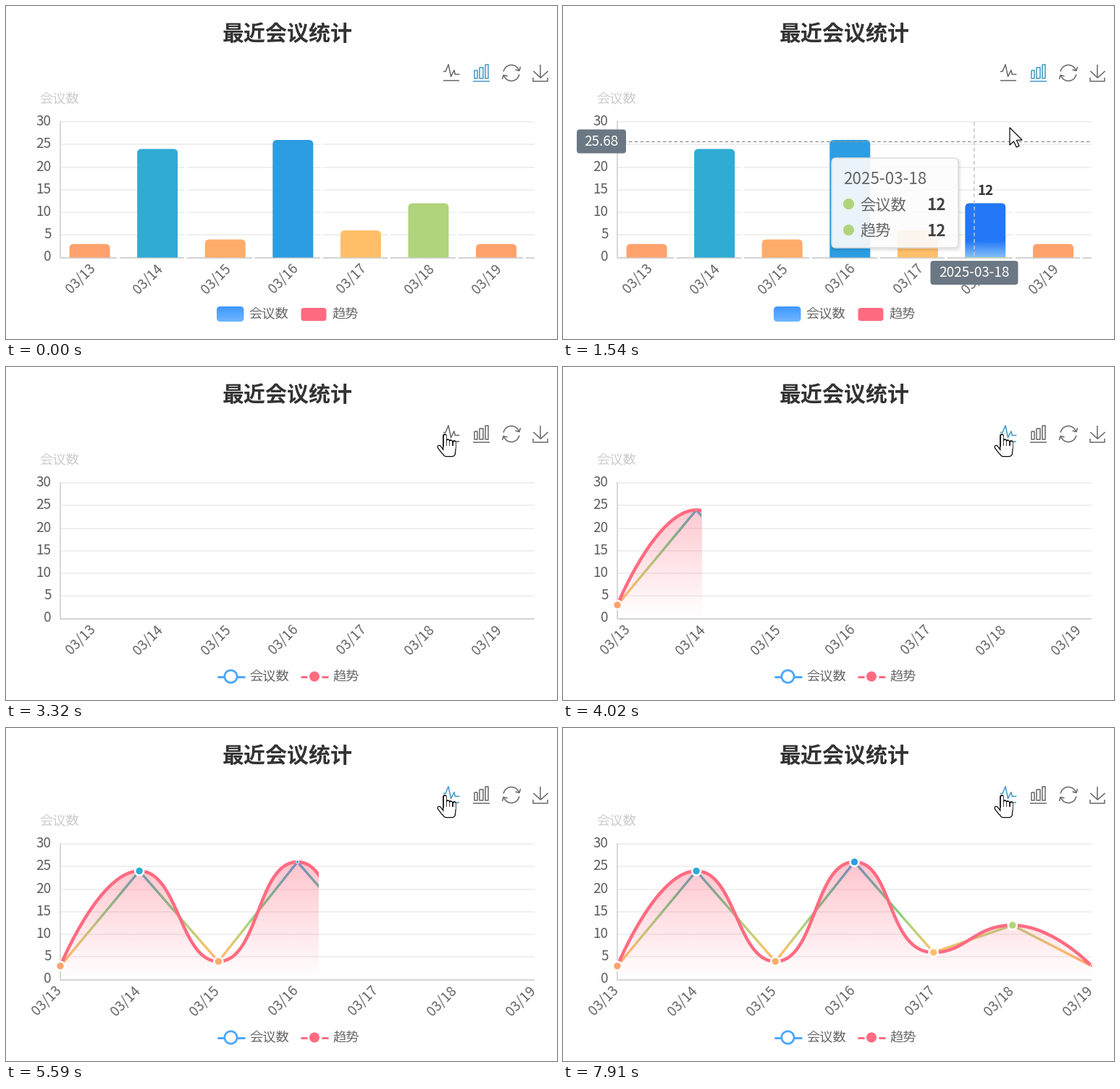
Recreate the animation shown at these times as a matplotlib script. Size 761 px wide and 460 px high, loop 8000 ms.

```python
import numpy as np
import matplotlib.pyplot as plt
from matplotlib.animation import FuncAnimation
from matplotlib.collections import LineCollection
from matplotlib.colors import LinearSegmentedColormap, to_rgba
from matplotlib.patches import Arc, Circle, FancyBboxPatch, PathPatch, Polygon
from matplotlib.path import Path
from matplotlib.transforms import Affine2D, Bbox

W, H, DPI = 761, 460, 64
STEP, LOOP = 50, 8000
LEFT, RIGHT, TOP, BASE = 75, 730, 160, 347.5
UNIT = (BASE - TOP) / 30
BAND = (RIGHT - LEFT) / 7
VALUES = [3, 24, 4, 26, 6, 12, 3]
DAYS = range(13, 20)
PINK, BLUE, GRAY, ACTIVE = "#ff6b81", "#4da6ff", "#666666", "#3e98c5"
SLATE = "#6b7883"
RAMP = LinearSegmentedColormap.from_list(
    "heat", ["#ff8770", "#ffbf69", "#b0d47b", "#5fc882", "#2fabd4", "#2a80ff"])

fig = plt.figure(figsize=(W / DPI, H / DPI), dpi=DPI, facecolor="white")
ax = fig.add_axes([0, 0, 1, 1])
ax.axis("off")
ax.set(xlim=(0, W), ylim=(H, 0))
ax.set_autoscale_on(False)
plt.rcParams["font.family"] = ["Noto Sans CJK JP", "DejaVu Sans"]


def pt(pixels):
    return pixels * 72 / DPI


def height(value):
    return BASE - value * UNIT


def heat(value):
    return RAMP(np.asarray(value) / 30)


def text(x, y, s, size=18.9, color=GRAY, ha="left", z=4, **kw):
    return ax.text(x, y, s, fontsize=pt(size), color=color, ha=ha, va="baseline", zorder=z, **kw)


def line(xs, ys, color, width, z=1, **kw):
    kw.setdefault("solid_capstyle", "butt")
    return ax.plot(xs, ys, color=color, lw=pt(width), zorder=z, **kw)[0]


def box(x, y, w, h, r, z=3, **kw):
    kw.setdefault("lw", 0)
    return ax.add_patch(FancyBboxPatch((x, y), w, h, zorder=z,
                                       boxstyle=f"round,pad=0,rounding_size={r}", **kw))


def circle(x, y, r, z, **kw):
    kw.setdefault("lw", 0)
    return ax.add_patch(Circle((x, y), r, zorder=z, **kw))


def gradient(x0, x1, y0, y1, start, end, z, hold=0):
    """Vertical colour ramp that keeps its first colour up to the share `hold`."""
    share = np.clip((np.linspace(0, 1, 128) - hold) / (1 - hold), 0, 1)[:, None, None]
    data = (1 - share) * np.array(to_rgba(start)) + share * np.array(to_rgba(end))
    return ax.imshow(data, extent=(x0, x1, y1, y0), aspect="auto",
                     interpolation="bilinear", zorder=z)


def show(artists, visible):
    for artist in artists:
        artist.set_visible(bool(visible))


# Title, grid and axes
text(388.5, 48.2, "最近会议统计", 30, "#333333", "center", weight="bold")
text(46.8, 133.5, "会议数", 18.3, "#cccccc")
for tick in range(0, 31, 5):
    y = height(tick)
    if tick:
        line([LEFT, RIGHT], [y, y], "#ebebeb", 1.5, 0.5)
    text(62.5, y + 5, str(tick), color="#5c5c5c", ha="right")
line([LEFT, LEFT], [TOP - 1, BASE], "#cccccc", 1.5, 0.8)
line([LEFT, RIGHT], [BASE + 0.5] * 2, "#c6c6c6", 1.5, 0.8)
day_labels = [text(0, 381, f"03/{d}", ha="center", rotation=45,
                   rotation_mode="anchor") for d in DAYS]


# Toolbox icons
def icon(cx, cy, scale, *strokes):
    points = np.concatenate(strokes)
    middle = (points.min(0) + points.max(0)) / 2
    parts = [(np.array(s) - middle) * scale + (cx, cy) for s in strokes]
    return [line(p[:, 0], p[:, 1], GRAY, 1.5, 5) for p in parts]


def column(x, y):
    return [(x, y), (x + 10, y), (x + 10, 48), (x, 48), (x, y)]


line_icon = icon(615.2, 92, 0.44, [(4, 58), (55, 58)],
                 [(4, 29), (11, 29), (20, 7), (28, 45), (38, 25), (41, 38), (55, 38)])
bar_icon = icon(656.5, 92.2, 0.41, [(3, 58), (57, 58)],
                *[column(6.7 + 18.3 * i, 23 - 10.5 * i) for i in range(3)])
icon(738.5, 92.4, 0.41, [(5, 23), (29.5, 45.5), (54.5, 23)], [(29.5, 45), (29.5, 0)],
     [(5, 44), (5, 58), (54, 58), (54, 44)])
for side in (1, -1):
    ax.add_patch(Arc((698, 92.5), 22, 22, theta1=100 - 90 * side, theta2=252 - 90 * side,
                     color=GRAY, lw=pt(1.5), zorder=5))
    line(698 + side * np.array([12.5, 11, 5.5]), 92.5 - side * np.array([8.5, 3, 4.5]),
         GRAY, 1.5, 5)


# Bars
def bar_path(x, value, w=56, r=6):
    t = height(value)
    points = [(x, BASE), (x, t + r), (x, t), (x + r, t), (x + w - r, t),
              (x + w, t), (x + w, t + r), (x + w, BASE), (x, BASE)]
    L, C = Path.LINETO, Path.CURVE3
    return Path(points, [Path.MOVETO, L, C, C, L, C, C, L, L])


bar_x = [LEFT + 12.6 + BAND * i for i in range(7)]
bars, bar_extras = [], []
for x, value in zip(bar_x, VALUES):
    bars.append(ax.add_patch(PathPatch(bar_path(x, value), fc=heat(value), lw=0, zorder=2)))
    bar_extras.append(line([x + 67.2] * 2, [height(value) - 2, BASE + 1.5], "white", 3.5, 1.5))
hot_bar = gradient(0, 56, 0, 1, "#2378f7", "#83bff6", 2.2, hold=0.7)
hot_label = text(0, 0, "", color="#333333", ha="center", weight="bold")

# Legends
swatch = box(291, 415, 37.5, 21, 5, fc="none")
fill = gradient(291, 328.5, 415, 436, "#4098ff", "#70b6ff", 3)
fill.set_clip_path(swatch)
bar_legend = [fill, box(407.5, 417, 35, 18, 4, fc=PINK)]
line_legend = [line([291.5, 329.5], [427.5] * 2, BLUE, 3, 3),
               circle(310.5, 427.5, 8.6, 4, fc="white", ec=BLUE, lw=pt(2.8)),
               line([407, 416], [427.5] * 2, PINK, 3, 3),
               line([436, 445], [427.5] * 2, PINK, 3, 3),
               circle(426, 427.5, 7, 4, fc=PINK)]
for group, shift in ((bar_legend, 0), (line_legend, 1)):
    group += [text(335.5 + shift, 430.5 + 1.5 * shift, "会议数", 18.3),
              text(450.5 + shift, 430.5 + 1.5 * shift, "趋势", 18.3)]

# Line chart
knots = np.array([(LEFT + i * (RIGHT - LEFT) / 6, height(v)) for i, v in enumerate(VALUES)])


def smooth_curve(points, tension=0.5):
    """Bezier spline whose handles stay inside the box of each segment."""
    inner, outer = points.copy(), points.copy()
    for i in range(1, len(points) - 1):
        before, p, after = points[i - 1:i + 2]
        a, b = np.hypot(*(p - before)), np.hypot(*(after - p))
        handle = p + (after - before) * tension * b / (a + b)
        handle = np.clip(handle, np.minimum(p, after), np.maximum(p, after))
        back = p - (handle - p) * a / b
        back = np.clip(back, np.minimum(p, before), np.maximum(p, before))
        inner[i], outer[i] = back, p + (p - back) * b / a
    s = np.linspace(0, 1, 40)[:, None]
    return np.concatenate([
        (1 - s) ** 3 * points[i] + 3 * s * (1 - s) ** 2 * outer[i]
        + 3 * s ** 2 * (1 - s) * inner[i + 1] + s ** 3 * points[i + 1]
        for i in range(len(points) - 1)])


curve = smooth_curve(knots)
trend = line(curve[:, 0], curve[:, 1], PINK, 4.5, 2.6, solid_joinstyle="round")

xs = np.union1d(np.linspace(LEFT, RIGHT, 330), knots[:, 0])
ys = np.interp(xs, knots[:, 0], knots[:, 1])
pairs = np.stack([xs, ys], axis=1)
middle = (ys[:-1] + ys[1:]) / 2
counts = ax.add_collection(LineCollection(
    np.stack([pairs[:-1], pairs[1:]], axis=1), colors=heat((BASE - middle) / UNIT),
    linewidths=pt(3), capstyle="projecting", zorder=2))

reveal = Bbox.from_extents(0, 0, LEFT, H)
for part in (trend, counts):
    part.set_clip_box(reveal)

# The area has no horizontal variation, so widening its extent reveals it.
area = gradient(LEFT, RIGHT, height(26), BASE, to_rgba(PINK, 0.4), to_rgba(PINK, 0), 2.3)
outline = np.concatenate([curve, [(RIGHT, BASE), (LEFT, BASE)]])
area.set_clip_path(Path(outline), ax.transData)
markers = [circle(*p, 6, 3, fc=heat(v), ec="white") for p, v in zip(knots, VALUES)]

# Cross pointer with its two axis tags
dash = (0, (3.5, 2.5))
cross_h = line([LEFT, RIGHT], [0, 0], "#929292", 1.3, 6, linestyle=dash)
cross_v = line([0, 0], [TOP, BASE], "#c4c4dc", 1.5, 6, linestyle=dash)
tag_y, tag_x = (box(0, 0, w, 33, 4, 7, fc=SLATE) for w in (68, 121))
tag_y_text, tag_x_text = (text(53, 374, "", color="white", ha="center", z=8) for _ in range(2))
pointer = [cross_h, cross_v, tag_y, tag_x, tag_y_text, tag_x_text, hot_bar, hot_label]

# Tooltip, laid out from its own top left corner
tip_move = Affine2D()
tip = [(box(1.5 - g, 2.5 - g, 175 + 2 * g, 124 + 2 * g, 6, 9, fc="black"), 0.025)
       for g in range(4)]
tip.append((box(0, 0, 175, 124, 6, 9.1, fc="white"), 0.9))
tip.append((box(0, 0, 175, 124, 6, 9.2, fc="none", ec="#dcdcdc", lw=pt(1.5)), 1))
tip_date = text(16, 36, "", 22.4, z=10)
tip_dots, tip_values, tip_names = [], [], []
for y, name in ((63.5, "会议数"), (99.5, "趋势")):
    tip_dots.append(circle(23.5, y, 7.5, 10))
    tip_names.append(text(39, y + 8, name, 21.3, z=10))
    tip_values.append(text(158, y + 8, "", 22.4, "#444444", "right", 10, weight="bold"))
tip += [(a, 1) for a in [tip_date, *tip_dots, *tip_values, *tip_names]]
for artist, _ in tip:
    artist.set_transform(tip_move + ax.transData)

# Mouse cursors
ARROW = np.array([(0, 0), (0, 24), (5.5, 19), (9.3, 27), (13, 25.3), (9.5, 17.5), (17, 17)])
arrow = ax.add_patch(Polygon(ARROW, fc="white", ec="black", lw=pt(1.2),
                             joinstyle="round", zorder=12))
fingers = [((606 + 4.2 * i,) * 2, (94.8 + (i > 0) * (6.5 + i), 111)) for i in range(4)]
thumb = ((598.3, 604), (110.5, 118))
palm = ((607.5, 616), (118.5, 118.5))
hand = []
for color, grow, z in (("black", 2.4, 12), ("white", 0, 13)):
    for (hx, hy), width in [(f, 3.3) for f in fingers] + [(thumb, 3.3), (palm, 8)]:
        hand.append(line(hx, hy, color, width + grow, z, solid_capstyle="round"))
    hand.append(box(604.4 - grow / 2, 109, 15.9 + grow, 9, 2, z, fc=color))

ax.set(xlim=(0, W), ylim=(H, 0))

# Key moments in ms
ENTER, LEAVE, GRAB, SWITCH, START = 880, 1900, 2640, 3320, 3500
LAG, SETTLED = 200, 1690
CURSOR = np.array([(640, 548, 414), (1340, 568, 187), (1540, 617, 168),
                   (2190, 601, 113.5), (GRAB, 606, 95)])


def cursor_at(t):
    return np.array([np.interp(t, CURSOR[:, 0], CURSOR[:, c]) for c in (1, 2)])


def draw_pointer(t):
    on = ENTER <= t < LEAVE
    show(pointer, on)
    x, y = cursor_at(max(min(t, SETTLED) - LAG, ENTER))
    index = int((cursor_at(t)[0] - LEFT) // BAND)
    value, day = VALUES[index], f"2025-03-{DAYS[index]}"
    if on:
        cross_h.set_ydata([y, y])
        cross_v.set_xdata([x, x])
        tag_y.set_bounds(19, y - 16.5, 68, 33)
        tag_x.set_bounds(x - 60.5, 352, 121, 33)
        tag_y_text.set_text(f"{(BASE - y) / UNIT:.2f}")
        tag_y_text.set_y(y + 6)
        tag_x_text.set_text(day)
        tag_x_text.set_x(x)
        left = bar_x[index]
        hot_bar.set_extent((left, left + 56, BASE, height(value)))
        hot_bar.set_clip_path(bars[index])
        hot_label.set_text(str(value))
        hot_label.set_position((left + 28, height(value) - 11.5))

    fade = np.interp(t, [ENTER, ENTER + 160, 2040, 2300], [0, 1, 1, 0])
    show([a for a, _ in tip], fade > 0)
    tip_move.clear().translate(x - 197, np.clip(y + 23, 200, 310))
    tip_date.set_text(day)
    for dot, label in zip(tip_dots, tip_values):
        dot.set_facecolor(heat(value))
        label.set_text(str(value))
    for artist, alpha in tip:
        artist.set_alpha(alpha * fade)


def draw_lines(t):
    progress = np.interp(t, [START, 4590, 5590, 7790], [0, 0.359, 0.545, 1.04])
    edge = LEFT + (RIGHT - LEFT) * min(progress, 1)
    show([trend, counts, area], progress > 0)
    reveal.x1 = edge
    area.set_extent((LEFT, max(edge, LEFT + 1), BASE, height(26)))
    for i, marker in enumerate(markers):
        size = np.clip((progress - i / 6) / 0.13, 0, 1)
        marker.set_visible(bool(size > 0))
        marker.set_radius(6 * size)
        marker.set_linewidth(pt(2.6 * size))
    slide = 1 - (1 - min(progress / 0.6, 1)) ** 3
    for i, label in enumerate(day_labels):
        band = LEFT + BAND * (i + 0.5)
        label.set_x(band + (knots[i, 0] - band) * slide - 14.8)


def update(frame):
    t = frame * STEP + 40
    bar_mode = t < SWITCH
    show(bars + bar_extras + bar_legend, bar_mode)
    show(line_legend, not bar_mode)
    for part in bar_icon:
        part.set_color(ACTIVE if bar_mode else GRAY)
    for part in line_icon:
        part.set_color(ACTIVE if 2990 <= t < SWITCH or t > START else GRAY)
    draw_pointer(t)
    draw_lines(t)
    arrow.set_visible(640 < t < GRAB)
    arrow.set_xy(ARROW + cursor_at(t))
    show(hand, t >= GRAB)
    return []


anim = FuncAnimation(fig, update, frames=LOOP // STEP, init_func=lambda: [],
                     interval=STEP, repeat=True, repeat_delay=0, blit=False)
plt.show()
```
